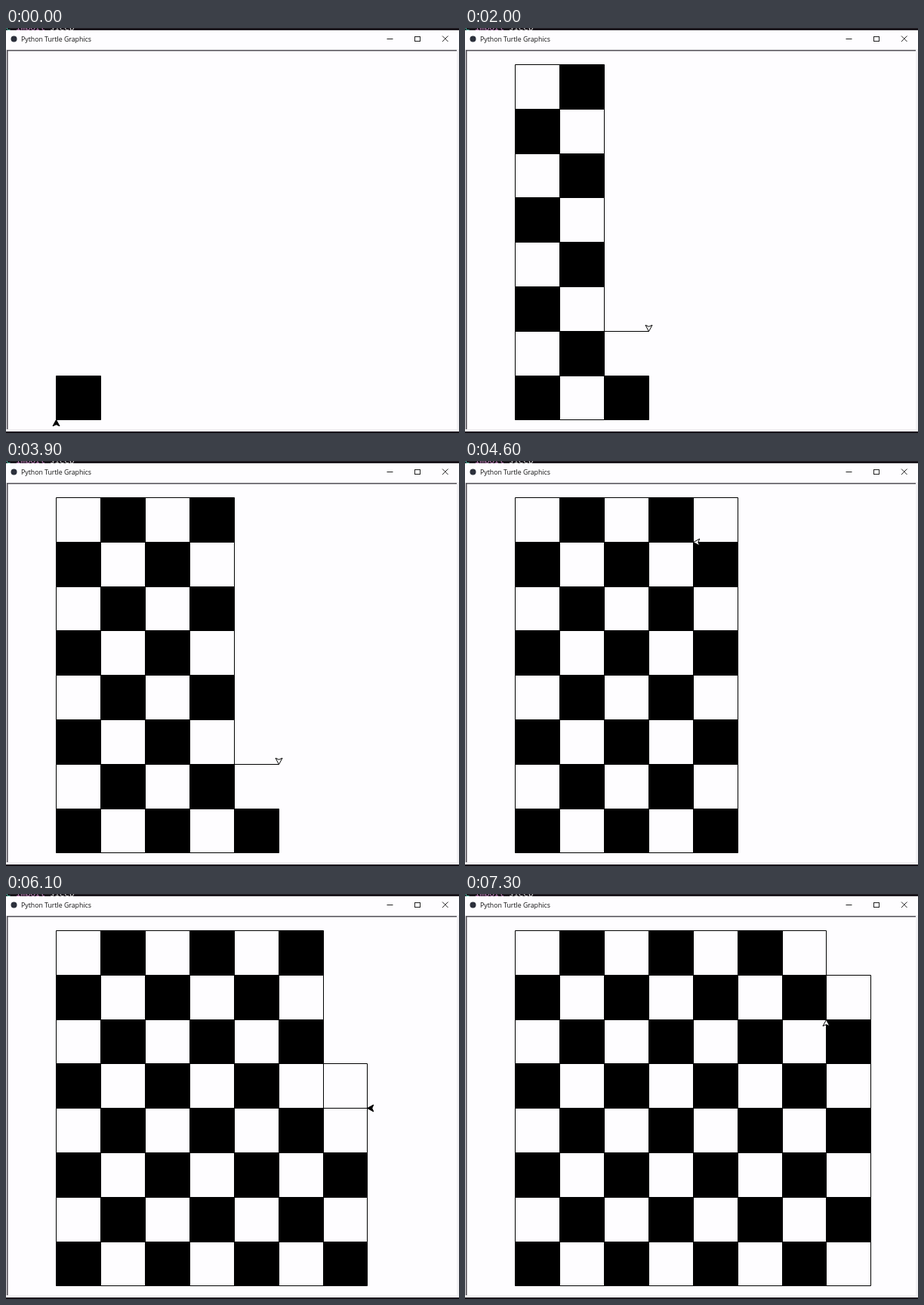
Animation of 600 by 536 pixels, one loop 7400 ms. Source, as an HTML page:

```html
<!DOCTYPE html>
<html lang="en">
<head>
<meta charset="utf-8">
<title>Turtle chessboard</title>
<style>
  html, body { margin: 0; width: 100%; height: 100%; overflow: hidden; background: #1b171d; }
  svg { display: block; width: 600px; height: 536px; }
  .code { font: 10.8px "Noto Sans Mono", monospace; }
  .title { font: 8.75px "Open Sans", sans-serif; }
</style>
</head>
<body>
<svg viewBox="0 0 600 536">
  <rect width="600" height="536" fill="#1b171d"/>
  <g class="code">
    <text x="0" y="3" fill="#4ec9b0">e</text>
    <text x="13" y="3" fill="#c586c0">import</text>
    <text x="58" y="3" fill="#d4d4d4">sleep</text>
  </g>

  <rect y="3" width="600" height="531" fill="#f2f1f4"/>
  <rect y="3" width="600" height="25" fill="#fefdff"/>
  <circle cx="10.5" cy="14.5" r="4" fill="#2c303c"/>
  <text class="title" x="20" y="17.6" fill="#111">Python Turtle Graphics</text>
  <g fill="none" stroke="#222">
    <path d="M504.500 14.500h8M578 10.500l7.500 7.500m0 -7.500l-7.500 7.500"/>
    <rect x="541.500" y="11.500" width="7" height="6"/>
  </g>

  <rect x="1" y="29" width="596" height="502" fill="#fefdff"/>
  <path d="M1.750 531V29.750H597" fill="none" stroke="#555359" stroke-width="1.700"/>

  <path id="fills"/>
  <path id="lines" fill="none" stroke="#000"/>
  <path id="turtle" d="M0 0L-4.500 8.300L0 6.300L4.500 8.300Z" stroke="#000"/>
</svg>
<script>
const FRAME_MS = 100, FRAMES = 74, SIZE = 8;
const STEPS = 11; // turtle commands per square: start, 4 x (forward, right), fill, pause

// Pace of the drawing: [frame, commands executed]
const PACE = [[0, 9], [12, 117], [29, 275], [39, 367], [53, 504],
              [56, 528], [61, 578], [72, 682], [73, 691]];

const [fills, lines, turtle] = ["fills", "lines", "turtle"].map(id => document.getElementById(id));

const edgeX = col => Math.floor(66.9 + 58.86 * col) + 0.5;
const edgeY = row => Math.round(518.4 - 58.8 * row) + 0.5;

// Corners in drawing order: clockwise from the bottom left
function corners(square) {
  const col = Math.floor(square / SIZE), row = square % SIZE;
  const [left, right, bottom, top] = [edgeX(col), edgeX(col + 1), edgeY(row), edgeY(row + 1)];
  return [[left, bottom], [left, top], [right, top], [right, bottom], [left, bottom]];
}

const isBlack = square => (Math.floor(square / SIZE) + square) % 2 === 0;
const polyline = points => "M" + points.join("L");

function commandsAt(frame) {
  const next = Math.max(1, PACE.findIndex(([f]) => f >= frame));
  const [f0, c0] = PACE[next - 1], [f1, c1] = PACE[next];
  return Math.round(c0 + (c1 - c0) * (frame - f0) / (f1 - f0));
}

function draw(frame) {
  const commands = commandsAt(frame);
  const current = Math.floor(commands / STEPS), step = commands % STEPS;
  const sides = Math.min(4, Math.ceil(step / 2));
  const turns = Math.min(4, Math.floor(step / 2));
  let filled = "", outline = "";

  for (let square = 0; square <= current; square++) {
    const points = corners(square), active = square === current;
    outline += polyline(active ? points.slice(0, sides + 1) : points);
    if (isBlack(square) && (!active || step >= 9)) filled += polyline(points) + "Z";
  }
  fills.setAttribute("d", filled);
  lines.setAttribute("d", outline);

  const [x, y] = corners(current)[sides];
  turtle.setAttribute("transform", `translate(${x} ${y}) rotate(${turns * 90})`);
  turtle.setAttribute("fill", isBlack(current) ? "#000" : "#fff");
}

const start = performance.now();
function tick() {
  draw(Math.floor((performance.now() - start) / FRAME_MS) % FRAMES);
  requestAnimationFrame(tick);
}
tick();
</script>
</body>
</html>
```
